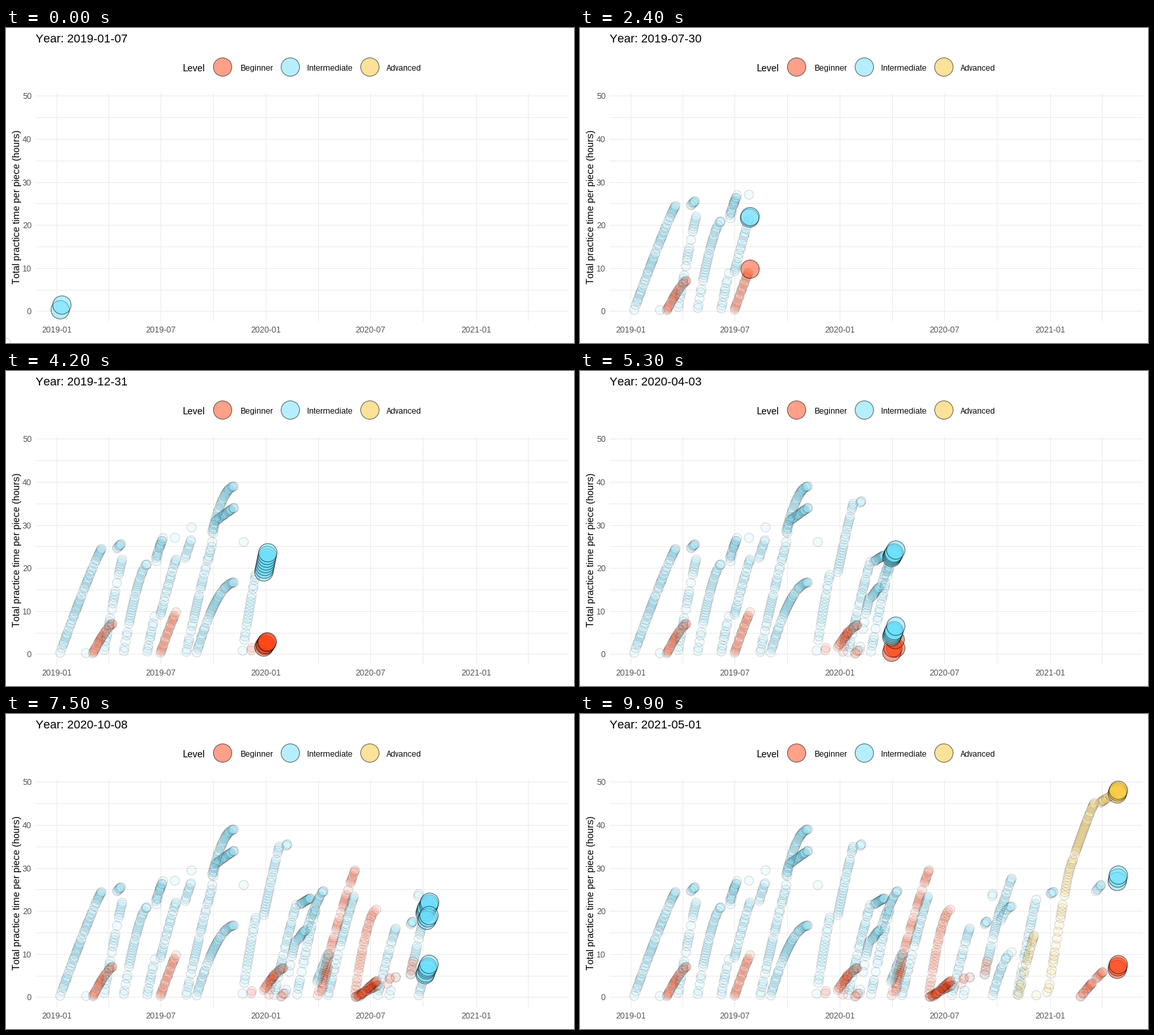
Animation of 864x480 px, one loop 10 s. Source, as a matplotlib script:

```python
import numpy as np
import matplotlib.pyplot as plt
from matplotlib.animation import FuncAnimation
from matplotlib.colors import to_rgba

W, H, DPI = 864, 480, 96
PT = 72 / DPI                    # points per pixel
FRAMES, SPAN = 100, 845          # frames per loop, days covered
EPOCH = np.datetime64("2019-01-01")
FIRST = 6                        # first day shown, counted from EPOCH
X0, DAY = 77.2, 0.8726           # stage x of EPOCH, pixels per day
Y0, HOUR = 431.8, 6.56           # stage y of zero hours, pixels per hour
BEG, MID, ADV = "#FF4314", "#6DE1FF", "#F9C633"

plt.rcParams.update({
    "font.family": "Liberation Sans",
    "text.hinting": "native",
    "text.hinting_factor": 1,
    "text.kerning_factor": 6,
})

rng = np.random.default_rng(7)
sessions = []


def piece(level, *stints, ease=1.1):
    """Practise one piece in stints of (first day, last day, total hours reached).

    Hours carry over between stints; ease > 1 makes progress slow down.
    """
    total = 0.0
    for a, b, goal in stints:
        days = np.arange(a, b + 1)
        u = (days - a + 1) / days.size
        hours = total + (goal - total) * (1 - (1 - u) ** ease)
        used = rng.random(days.size) < 0.7
        used[[0, -1]] = True
        sessions.extend((d, h, *to_rgba(level)) for d, h in zip(days[used], hours[used]))
        total = goal


piece(MID, (580, 582, 1.6), (591, 591, 4.7), (617, 645, 20.8), (648, 664, 27.6))

piece(BEG, (63, 97, 7.1), ease=1.3)
piece(BEG, (181, 208, 9.8))
piece(BEG, (339, 340, 1.5), (361, 395, 6.8), ease=1.4)
piece(BEG, (370, 378, 5.2))
piece(BEG, (391, 396, 0.9), (462, 473, 7))
piece(BEG, (455, 520, 29.5))
piece(BEG, (520, 557, 20.4), ease=1.7)
piece(BEG, (521, 560, 2.8), (576, 581, 4.5), (591, 591, 4.6), (617, 621, 8.4))
piece(BEG, (527, 558, 3.8))
piece(BEG, (784, 823, 5.9), (848, 850, 7.6))

piece(MID, (6, 78, 24.5), (105, 112, 25.6))
piece(MID, (51, 51, 0.3), (83, 114, 22), (173, 185, 27), (206, 206, 27.1))
piece(MID, (117, 157, 20.9), (174, 184, 26.3), (235, 235, 29.5), ease=1.5)
piece(MID, (158, 171, 8.8), (181, 208, 22), (224, 234, 26.5), (326, 326, 26.1))
piece(MID, (226, 270, 25), (271, 276, 31), (278, 309, 34))
piece(MID, (244, 309, 16.7), (617, 621, 17.6), (645, 664, 21.1), ease=1.8)
piece(MID, (271, 271, 28.5), (272, 309, 39), ease=1.9)
piece(MID, (324, 347, 18.5), (361, 388, 35), (400, 402, 35.6))
piece(MID, (379, 418, 21.5), (424, 442, 23), (630, 631, 24), (732, 737, 24.5),
      (811, 820, 26.1), (848, 850, 28.4))
piece(MID, (399, 417, 13.2), (421, 433, 15.5), (436, 465, 24.7), ease=1.3)
piece(MID, (419, 451, 20.2))
piece(MID, (454, 454, 3.7), (455, 473, 10))
piece(MID, (473, 518, 23.4))
piece(MID, (560, 591, 16))
piece(MID, (631, 664, 10.5), ease=1.6)
piece(MID, (674, 707, 22.7))

piece(ADV, (676, 703, 14.3))
piece(ADV, (707, 707, 0.5), (726, 726, 1.3), (729, 765, 29.7), (766, 808, 45.1),
      (818, 837, 46.8), (848, 850, 48.1))

sessions = np.array(sessions)
day, hour, colors = sessions[:, 0], sessions[:, 1], sessions[:, 2:]
spots = np.column_stack([X0 + DAY * day, Y0 - HOUR * hour])
step = np.round((day - FIRST) * (FRAMES - 1) / SPAN)

fig = plt.figure(figsize=(W / DPI, H / DPI), dpi=DPI, facecolor="white")
ax = fig.add_axes([0, 0, 1, 1])
ax.set(xlim=(0, W), ylim=(H, 0))
ax.axis("off")


def label(x, y, text, px, color="black", **kw):
    return ax.text(x, y, text, fontsize=px * PT, color=color, va="baseline", **kw)


def bubbles(radius, edge, z):
    return ax.scatter([], [], s=(2 * radius * PT) ** 2, linewidths=PT,
                      edgecolors=[(0, 0, 0, edge)], zorder=z)


def fill(group, xy, rgba, alpha):
    rgba = np.array(rgba)
    rgba[:, 3] = alpha
    group.set_offsets(xy)
    group.set_facecolor(rgba)


# Grid and axis labels: half-year ticks with lines halfway between
ticks = np.arange("2019-01", "2021-08", 6, dtype="datetime64[M]")
tick_days = (ticks.astype("datetime64[D]") - EPOCH).astype(int)
mids = (tick_days[1:] + tick_days[:-1]) / 2
grid_x = np.floor(X0 + DAY * np.r_[tick_days[:-1], mids]) + 0.5
grid_y = np.floor(Y0 - HOUR * np.arange(0, 51, 5)) + 0.5
grid = dict(color="#EBEBEB", lw=PT, zorder=1, snap=False)
ax.vlines(grid_x, 100, 447, **grid)
ax.hlines(grid_y, 45, 856, **grid)

for x, month in zip(grid_x, ticks[:-1]):
    label(x - 0.5, 464, str(month), 12, "#4D4D4D", ha="center")
for i, y in enumerate(grid_y[::2]):
    label(39, y + 4.5, str(10 * i), 12, "#4D4D4D", ha="right")
label(21, 272.5, "Total practice time per piece (hours)", 15,
      rotation=90, rotation_mode="anchor", ha="center")

# Legend
label(269, 66, "Level", 15)
for x, text in [(356, "Beginner"), (458, "Intermediate"), (579, "Advanced")]:
    label(x, 65, text, 12)
keys = bubbles(14, 0.6, 2)
fill(keys, [(329.5, 59.5), (432.5, 59.5), (553.5, 59.5)],
     [to_rgba(c) for c in (BEG, MID, ADV)], 0.5)

title = label(45, 22, "", 18)
past = bubbles(7, 0.15, 3)
now = bubbles(14, 0.6, 4)


def update(k):
    old, new = step < k, step == k
    fill(past, spots[old], colors[old], 0.1)
    fill(now, spots[new], colors[new], 0.5)
    title.set_text(f"Year: {EPOCH + FIRST + k * SPAN // (FRAMES - 1)}")
    return past, now, title


anim = FuncAnimation(fig, update, frames=FRAMES, interval=100, repeat=True, repeat_delay=0)
plt.show()
```
